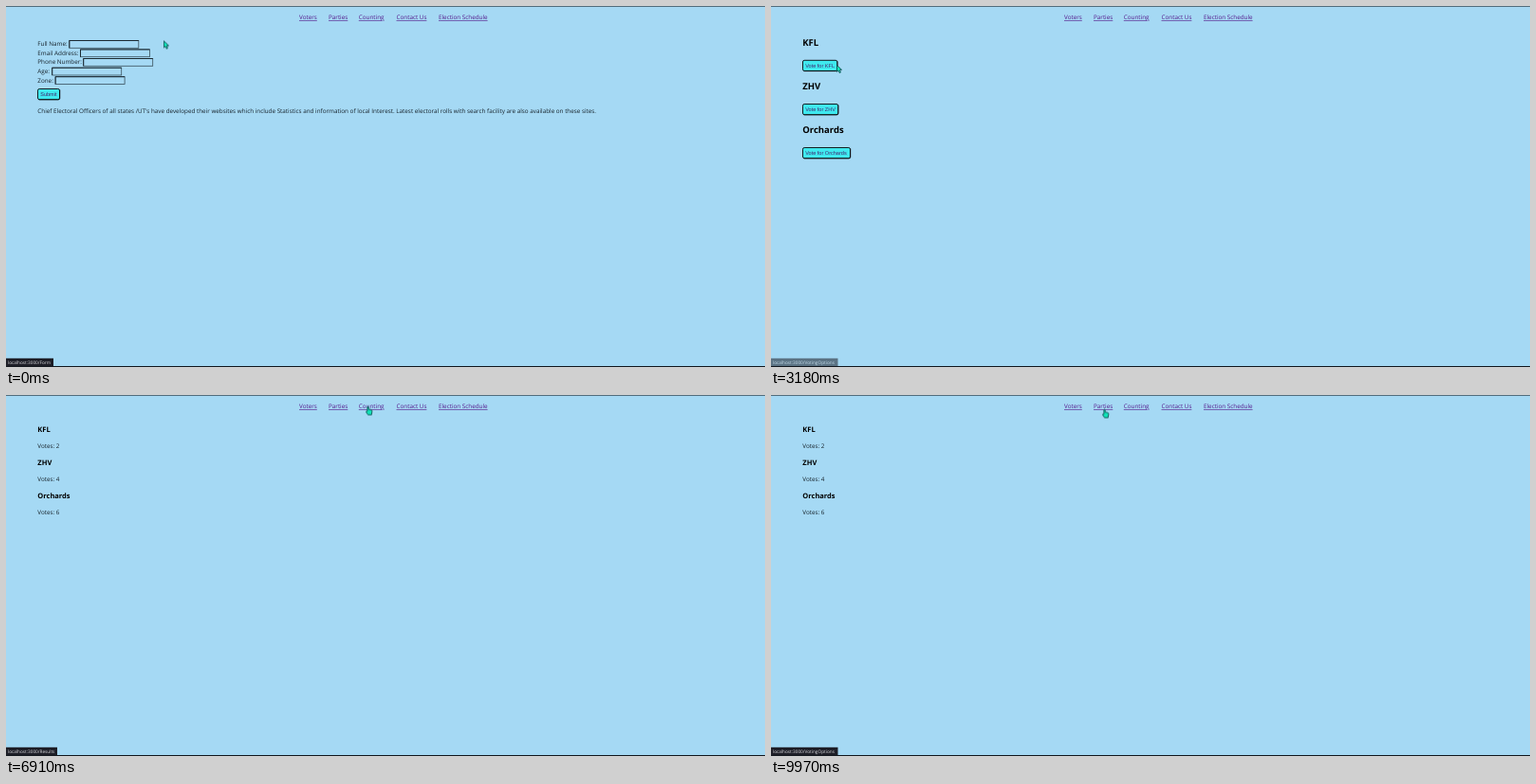
An HTML page that plays this animation: 800x381 px, repeating every 10000 ms.

```html
<!DOCTYPE html>
<html lang="en">
<head>
<meta charset="utf-8">
<title>Voting site</title>
<style>
html, body { margin: 0; width: 100%; height: 100%; overflow: hidden; background: #a5d9f4; }
svg { display: block; width: 800px; height: 381px; }
text { font: 6.32px "Open Sans", "Noto Sans", sans-serif; fill: #16222a; text-rendering: geometricPrecision; white-space: pre; }
.nav text { fill: #551a8b; text-decoration: underline; text-decoration-thickness: .5px; }
.h2 { font-size: 9.5px; font-weight: 700; fill: #000; }
.h3 { font-size: 7.5px; font-weight: 700; fill: #000; }
.btn text { font: 5.56px "Liberation Sans", Arial, sans-serif; fill: #43256f; }
.btn rect { fill: #3fe9ef; stroke: #0b1518; stroke-width: .95; }
.btn path { fill: none; stroke: #000; stroke-width: .6; }
.field rect { fill: none; stroke: #39505c; stroke-width: .8; }
.field path { fill: none; stroke: #15222a; stroke-width: .9; }
.status rect { fill: #1d1e27; }
.status text { font-size: 4.74px; fill: #dcdde0; }
#cursor path { fill: #10e3b8; stroke: #0b4547; stroke-width: .8; stroke-linejoin: round; }

.page, .arrow, .hand { animation: 10s step-end infinite; }
.status { animation: 10s linear infinite; opacity: 0; }
#form { animation-name: form; }
#vote { animation-name: vote; }
#results { animation-name: results; }
.arrow { animation-name: arrow; }
.hand { animation-name: hand; }
#toForm { animation-name: toForm; }
#toVote { animation-name: toVote; }
#toResults { animation-name: toResults; }
#toContact { animation-name: toContact; }
#cursor { animation: move 10s ease-in-out infinite; }

@keyframes form { 0% { visibility: visible } 25%, 100% { visibility: hidden } }
@keyframes vote { 0% { visibility: hidden } 25% { visibility: visible } 66.8%, 100% { visibility: hidden } }
@keyframes results { 0% { visibility: hidden } 66.8%, 100% { visibility: visible } }
@keyframes hand {
  0%, 28%, 75.5% { visibility: hidden }
  18.7%, 65.2%, 93%, 100% { visibility: visible }
}
@keyframes arrow {
  0%, 28%, 75.5% { visibility: visible }
  18.7%, 65.2%, 93%, 100% { visibility: hidden }
}
@keyframes toForm { 0%, 1% { opacity: 1 } 3%, 100% { opacity: 0 } }
@keyframes toVote {
  0%, 19.2% { opacity: 0 }
  19.5%, 30.9% { opacity: 1 }
  32.9%, 98.49% { opacity: 0 }
  98.5%, 100% { opacity: 1 }
}
@keyframes toResults {
  0%, 65.5% { opacity: 0 }
  65.9%, 78% { opacity: 1 }
  80%, 97.29% { opacity: 0 }
  97.3%, 98.5% { opacity: 1 }
  98.51%, 100% { opacity: 0 }
}
@keyframes toContact {
  0%, 93.3% { opacity: 0 }
  93.6%, 97.3% { opacity: 1 }
  97.31%, 100% { opacity: 0 }
}
@keyframes move {
  0%, .3% { transform: translate(166px, 36.5px) }
  3.6%, 6.1% { transform: translate(110px, 56px) }
  10.6%, 13% { transform: translate(372px, 45px) }
  16.1% { transform: translate(361px, 42.5px) }
  19.2%, 27.6% { transform: translate(348px, 12px) }
  31.8% { transform: translate(69px, 62px) }
  33.3%, 37% { transform: translate(62px, 64px) }
  39.5%, 42% { transform: translate(60px, 109px) }
  46% { transform: translate(59px, 153px) }
  49.4%, 53.9% { transform: translate(61.5px, 161px) }
  57%, 60.5% { transform: translate(61px, 159px) }
  66%, 74.5% { transform: translate(379px, 11.5px) }
  76.5% { transform: translate(388px, 25px) }
  84% { transform: translate(440px, 22px) }
  87% { transform: translate(461px, 5.5px) }
  89.5% { transform: translate(482px, .5px) }
  93.5%, 95.8% { transform: translate(432px, 12px) }
  99.7%, 100% { transform: translate(349px, 14.5px) }
}
</style>
</head>
<body>
<svg viewBox="0 0 800 381">
  <rect width="800" height="381" fill="#a5d9f4"/>
  <rect width="800" height="1" fill="#526c7c"/>
  <rect y="380" width="800" height="1" fill="#10161c"/>
  <g class="nav">
    <text x="309" y="14.2">Voters</text>
    <text x="340" y="14.2">Parties</text>
    <text x="371.8" y="14.2">Counting</text>
    <text x="411.5" y="14.2">Contact Us</text>
    <text x="456" y="14.2">Election Schedule</text>
  </g>

  <g id="form" class="page">
    <text x="33.3" y="42.2">Full Name:</text>
    <text x="33.3" y="51.8">Email Address:</text>
    <text x="33.3" y="61.4">Phone Number:</text>
    <text x="33.3" y="71">Age:</text>
    <text x="33.3" y="80.6">Zone:</text>
    <defs>
      <g id="field" class="field">
        <rect x=".5" y=".5" width="73" height="7.8"/>
        <path d="M.5 8.3V.5H73.5"/>
      </g>
    </defs>
    <use href="#field" x="66.3" y="36"/>
    <use href="#field" x="78" y="45.4"/>
    <use href="#field" x="81.2" y="55"/>
    <use href="#field" x="48.2" y="64.7"/>
    <use href="#field" x="51.6" y="74.2"/>
    <g class="btn" transform="translate(33 87)">
      <rect x=".5" y=".5" width="23" height="11.2" rx="1.7"/>
      <path d="M1.5 11.9H22.4Q23.8 11.9 23.8 10.4V1.5"/>
      <text x="3.2" y="8">Submit</text>
    </g>
    <text x="33.3" y="112.8">Chief Electoral Officers of all states /UT's have developed their websites which include Statistics and information of local Interest. Latest electoral rolls with search facility are also available on these sites.</text>
  </g>

  <g id="vote" class="page">
    <text class="h2" x="33.3" y="41.5">KFL</text>
    <g class="btn" transform="translate(33 56.8)">
      <rect x=".5" y=".5" width="36.3" height="11.2" rx="1.7"/>
      <path d="M1.5 11.9H35.7Q37.1 11.9 37.1 10.4V1.5"/>
      <text x="3.2" y="8">Vote for KFL</text>
    </g>
    <text class="h2" x="33.3" y="87.8">ZHV</text>
    <g class="btn" transform="translate(33 103)">
      <rect x=".5" y=".5" width="37.2" height="11.2" rx="1.7"/>
      <path d="M1.5 11.9H36.6Q38 11.9 38 10.4V1.5"/>
      <text x="3.2" y="8">Vote for ZHV</text>
    </g>
    <text class="h2" x="33.3" y="134">Orchards</text>
    <g class="btn" transform="translate(33 149)">
      <rect x=".5" y=".5" width="50" height="11.2" rx="1.7"/>
      <path d="M1.5 11.9H49.4Q50.8 11.9 50.8 10.4V1.5"/>
      <text x="3.2" y="8">Vote for Orchards</text>
    </g>
  </g>

  <g id="results" class="page">
    <text class="h3" x="33.3" y="39.2">KFL</text>
    <text x="33.3" y="56.2">Votes: 2</text>
    <text class="h3" x="33.3" y="74">ZHV</text>
    <text x="33.3" y="91">Votes: 4</text>
    <text class="h3" x="33.3" y="108.8">Orchards</text>
    <text x="33.3" y="125.9">Votes: 6</text>
  </g>

  <g id="toForm" class="status">
    <rect y="371.8" width="50" height="8.6"/><text x="2" y="377.8">localhost:3000/Form</text>
  </g>
  <g id="toVote" class="status">
    <rect y="371.8" width="70.5" height="8.6"/><text x="2" y="377.8">localhost:3000/VotingOptions</text>
  </g>
  <g id="toResults" class="status">
    <rect y="371.8" width="54" height="8.6"/><text x="2" y="377.8">localhost:3000/Results</text>
  </g>
  <g id="toContact" class="status">
    <rect y="371.8" width="55" height="8.6"/><text x="2" y="377.8">localhost:3000/Contact</text>
  </g>

  <g id="cursor">
    <path class="arrow" d="M.4 .4V7.4L2 6.1L3.2 8.6L4.5 8L3.4 5.6L5.5 5.3Z"/>
    <path class="hand" d="M1.9 1.2Q2.6 .1 3.2 1.2V3.6L6 4.2Q7 4.6 6.9 5.6L6.3 9.4H2.6L.5 6.4Q.3 5.3 1.9 5.8Z"/>
  </g>
</svg>
</body>
</html>
```
